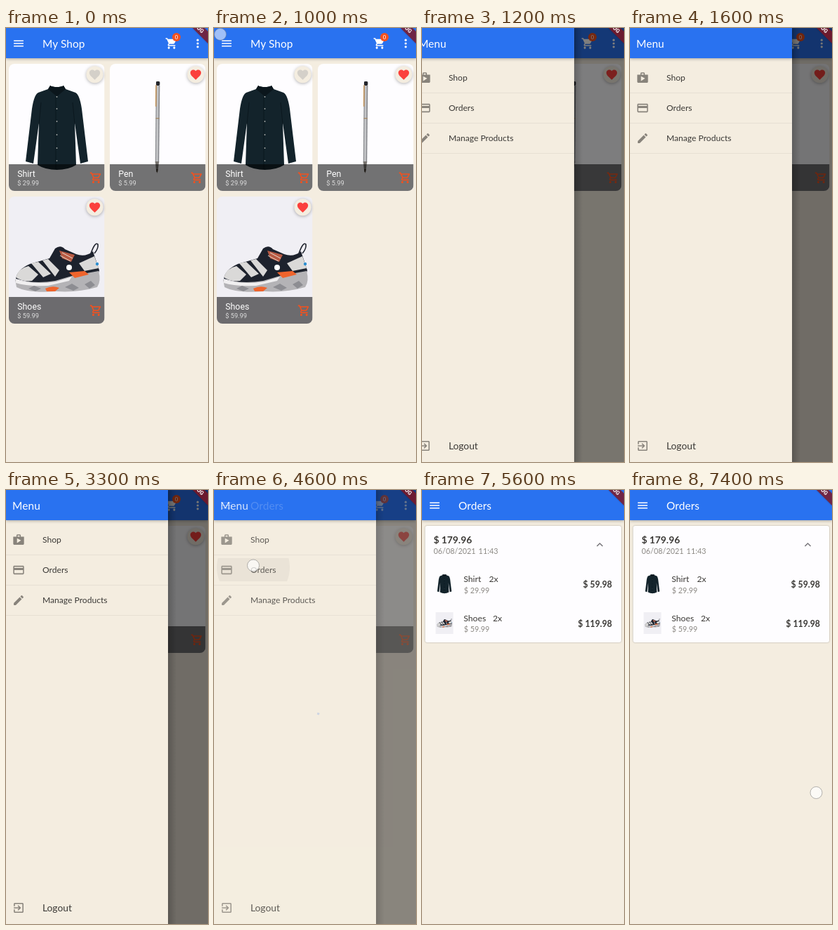
These frames come from a looping animation (288 by 618 pixels, 7500 ms). An HTML page:

```html
<!DOCTYPE html>
<html lang="en">
<head>
<meta charset="utf-8">
<title>Shop app</title>
<style>
  html, body { margin: 0; width: 100%; height: 100%; overflow: hidden; background: #f4ede0; }
  svg { display: block; width: 100%; height: 100%; }
  text { font-family: Lato, sans-serif; white-space: pre; }
  .roboto { font-family: Roboto, sans-serif; }
  .bold { font-weight: 700; }
  .bar { filter: drop-shadow(0 1.5px 2px rgba(0,0,0,.3)); }
  .card { filter: drop-shadow(0 .8px 1px rgba(0,0,0,.3)); }
</style>
</head>
<body>
<svg id="stage" viewBox="0 0 288 618"></svg>
<script>
const LOOP = 7500, DRAWER_W = 231;
const BLUE = '#2972f0', CREAM = '#f4ede0', ORANGE = '#f4511e';
const INK = '#3b3936', GREY = '#8b8883', ICON = '#88837b';

const wheels = 'M7 18c-1.1 0-1.99.9-1.99 2S5.9 22 7 22s2-.9 2-2-.9-2-2-2zm10 0c-1.1 0-1.99.9-1.99 2s.89 2 1.99 2 2-.9 2-2-.9-2-2-2z';
const icons = {
  menu: 'M3 18h18v-2H3v2zm0-5h18v-2H3v2zm0-7v2h18V6H3z',
  cart: wheels + 'M1 2v2h2l3.6 7.59-1.35 2.45c-.16.28-.25.61-.25.96 0 1.1.9 2 2 2h12v-2H7.42c-.14 0-.25-.11-.25-.25l.03-.12.9-1.63h7.45c.75 0 1.41-.41 1.75-1.03l3.58-6.49c.08-.14.12-.31.12-.48 0-.55-.45-1-1-1H5.21l-.94-2H1z',
  cartLine: wheels + 'M15.55 13c.75 0 1.41-.41 1.75-1.03l3.58-6.49c.37-.66-.11-1.48-.87-1.48H5.21l-.94-2H1v2h2l3.6 7.59-1.35 2.44C4.52 15.37 5.48 17 7 17h12v-2H7l1.1-2h7.45zM6.16 6h12.15l-2.76 5H8.53L6.16 6z',
  heart: 'M12 21.35l-1.45-1.32C5.4 15.36 2 12.28 2 8.5 2 5.42 4.42 3 7.5 3c1.74 0 3.41.81 4.5 2.09C13.09 3.81 14.76 3 16.5 3 19.58 3 22 5.42 22 8.5c0 3.78-3.4 6.86-8.55 11.54L12 21.35z',
  shop: 'M16 6V4c0-1.11-.89-2-2-2h-4c-1.11 0-2 .89-2 2v2H2v13c0 1.11.89 2 2 2h16c1.11 0 2-.89 2-2V6h-6zm-6-2h4v2h-4V4zM9 18V9l7.5 4L9 18z',
  card: 'M20 4H4c-1.11 0-1.99.89-1.99 2L2 18c0 1.11.89 2 2 2h16c1.11 0 2-.89 2-2V6c0-1.11-.89-2-2-2zm0 14H4v-6h16v6zm0-10H4V6h16v2z',
  edit: 'M3 17.25V21h3.75L17.81 9.94l-3.75-3.75L3 17.25zM20.71 7.04c.39-.39.39-1.02 0-1.41l-2.34-2.34c-.39-.39-1.02-.39-1.41 0l-1.83 1.83 3.75 3.75 1.83-1.83z',
  exit: 'M10.09 15.59L11.5 17l5-5-5-5-1.41 1.41L12.67 11H3v2h9.67l-2.58 2.59zM19 3H5c-1.11 0-2 .9-2 2v4h2V5h14v14H5v-4H3v4c0 1.1.89 2 2 2h14c1.1 0 2-.9 2-2V5c0-1.1-.9-2-2-2z',
  chevron: 'M12 8l-6 6 1.41 1.41L12 10.83l4.59 4.58L18 14z'
};

const icon = (name, x, y, fill) =>
  `<path d="${icons[name]}" fill="${fill}" transform="translate(${x} ${y}) scale(.768) translate(-12 -12)"/>`;
const text = (x, y, str, size, fill = INK, more = '') =>
  `<text x="${x}" y="${y}" font-size="${size}" fill="${fill}" ${more}>${str}</text>`;
const rect = (x, y, w, h, fill, more = '') =>
  `<rect x="${x}" y="${y}" width="${w}" height="${h}" fill="${fill}" ${more}/>`;
const path = (d, fill, more = '') => `<path d="${d}" fill="${fill}" ${more}/>`;
const appBar = (title, x = 52, w = 288) =>
  rect(0, 0, w, 43, BLUE, 'class="bar"') + text(x, 27.5, title, 15.4, '#fff', 'letter-spacing=".12"');

// left half, mirrored about x = 72.5
const halfShirt = path('M73 84Q66 84 63 82L60 87L46 92Q40 95 37 115L28 190L39 193L47 135L45 195Q56 202 73 202Z', '#13232b') +
  path('M73 98L60 87L63 82Q66 84 73 84Z', '#0b161c') +
  path('M47 137L50 106', 'none', 'stroke="#0a151b" stroke-width=".8"');
const shirt = halfShirt + `<g transform="translate(145 0) scale(-1 1)">${halfShirt}</g>` +
  path('M71 98V201', 'none', 'stroke="#0a151b" stroke-width=".8"') +
  [98, 115, 133, 152, 171, 189].map(y => `<circle cx="72.5" cy="${y}" r=".9" fill="#a9adab"/>`).join('');

const pen = `<g transform="rotate(.6 216 140)">` +
  rect(213.3, 82, 5.4, 110, 'url(#steel)') + rect(213.3, 76, 5.4, 6, '#24262b', 'rx="1.5"') +
  path('M213.3 190H218.7L217 205H215Z', '#77736f') + path('M214.7 201H217.3L216 207Z', '#3f3426') +
  rect(212.5, 81, 1.8, 31, '#c49a68', 'rx=".9"') + rect(213.3, 128, 5.4, 1.2, '#a58863') + '</g>';

const shoe = path('M121 321Q127 304 131 308Q132 314 126 321', 'none', 'stroke="#20242e" stroke-width="1.6"') +
  path('M14 357Q16 344 34 336L62 328L70 314Q78 308 84 315L100 322Q113 327 124 318L133 345L128 362L60 368Z', '#1d222d') +
  path('M14 355Q18 342 32 339L46 351L37 360Q24 362 14 355ZM36 335L46 333L64 350L53 355ZM52 331L60 329L76 345L70 354ZM104 335L126 325L132 342L112 346Z', '#dad9d8') +
  path('M76 317L98 323L93 333L80 328Z', '#b85a43') +
  path('M80 320L95 328M77 324L92 332', 'none', 'stroke="#e9d9cc" stroke-width="1"') +
  path('M13 358Q42 365 70 360L94 353L132 346Q136 360 130 369Q102 377 72 375Q32 378 15 369Z', '#b4b3b6') +
  path('M14 358Q42 366 72 361L94 354L90 360L60 367Q28 368 14 363Z', '#f0eff0') +
  path('M90 348L112 346L118 351L98 356ZM56 371Q66 366 76 370L70 375H58Z', '#ef642c') +
  path('M32 371L40 367L50 371L42 375ZM84 369L94 364L104 370L96 374ZM112 365L121 360L127 366L119 371Z', '#8d8d92') +
  '<circle cx="130" cy="336" r="2.2" fill="#2f8fd0"/><circle cx="90" cy="341" r="4" fill="#fff"/>';

function tile(x, y, name, price, photo, back, liked) {
  return `<g clip-path="inset(0 round 8px)">${rect(x, y, 136.5, 181, back)}${photo}
      ${rect(x, y + 143, 136.5, 38, '#000', 'opacity=".55"')}</g>` +
    text(x + 12.3, y + 161, name, 12.3, '#fff', 'class="roboto"') +
    text(x + 12.3, y + 173, price, 9.2, '#dedede', 'class="roboto"') +
    icon('cartLine', x + 124.3, y + 162.3, ORANGE) +
    `<circle cx="${x + 122.5}" cy="${y + 15.3}" r="12" fill="${CREAM}" class="bar"/>` +
    icon('heart', x + 122.5, y + 15.5, liked ? '#fb403c' : '#d4d0c9');
}

const menuRow = (y, name, label, size = 12.1) =>
  icon(name, 18, y, ICON) + text(52, y + size * .37, label, size);

const orderRow = (y, name, qtyX, price, total) =>
  text(59.3, y, name, 12.2) + text(qtyX, y, '2x', 12.2) +
  text(59.8, y + 15.5, price, 10.75, GREY) +
  text(271, y + 8, total, 12.3, INK, 'class="bold" text-anchor="end"');

document.getElementById('stage').innerHTML = `
  <defs>
    <linearGradient id="steel"><stop stop-color="#77797d"/><stop offset=".45" stop-color="#d6d7d9"/><stop offset="1" stop-color="#707277"/></linearGradient>
    <linearGradient id="shade"><stop stop-opacity=".2"/><stop offset="1" stop-opacity="0"/></linearGradient>
    <clipPath id="fold"><rect id="foldBox" x="4" y="51" width="281" height="166"/></clipPath>
    <clipPath id="row"><rect x="0" y="97" width="231" height="33"/></clipPath>
  </defs>
  <g id="shop">
    ${rect(0, 0, 288, 618, CREAM)}
    ${tile(4, 51, 'Shirt', '$ 29.99', shirt, '#fefdff', false)}
    ${tile(148, 51, 'Pen', '$ 5.99', pen, '#fefdff', true)}
    ${tile(4, 240, 'Shoes', '$ 59.99', shoe, '#f0eff4', true)}
    ${appBar('My Shop')}
    ${icon('menu', 18, 22, '#fff')}
    ${icon('cart', 236, 22, '#fff')}
    <circle cx="243" cy="13" r="6" fill="${ORANGE}"/>
    ${text(243, 15.8, '0', 7.7, '#fff', 'text-anchor="middle"')}
    ${[17.2, 22, 26.8].map(y => `<circle cx="273.3" cy="${y}" r="1.6" fill="#fff"/>`).join('')}
  </g>
  ${rect(0, 0, 288, 618, '#000', 'id="scrim"')}
  <g id="drawer">
    ${rect(DRAWER_W, 0, 12, 618, 'url(#shade)')}
    ${rect(0, 0, DRAWER_W, 618, CREAM)}
    ${appBar('Menu', 9, DRAWER_W)}
    <g clip-path="url(#row)"><circle id="ripple" cx="56" cy="110" fill="#000" opacity=".05"/></g>
    ${[92.5, 135.5, 178.5].map(y => rect(0, y - .4, DRAWER_W, .8, '#000', 'opacity=".08"')).join('')}
    ${menuRow(71, 'shop', 'Shop')}
    ${menuRow(114, 'card', 'Orders')}
    ${menuRow(157, 'edit', 'Manage Products')}
    ${menuRow(595, 'exit', 'Logout', 13.8)}
  </g>
  <g id="orders">
    ${rect(0, 0, 288, 618, CREAM)}
    ${appBar('Orders')}
    ${icon('menu', 18, 22, '#fff')}
    <path id="spinner" fill="none" stroke="${BLUE}" stroke-width="3"/>
    <g id="list">
      ${rect(4.5, 51, 279.5, 166, '#fefdff', 'id="sheet" rx="3" class="card"')}
      <g clip-path="url(#fold)">
        ${text(16.5, 75.5, '$ 179.96', 13.8, INK, 'class="bold"')}
        ${text(16.5, 91, '06/08/2021 11:43', 10.75, GREY, 'letter-spacing=".05" word-spacing="1.2"')}
        <g id="arrow">${icon('chevron', 253.5, 78, '#77757a')}</g>
        <g transform="translate(15.3 101.7) scale(.23 .225)">${shirt}</g>
        ${rect(19.5, 174, 25, 31, '#f0eff4')}
        <g transform="translate(18.8 128) scale(.18)">${shoe}</g>
        ${orderRow(131, 'Shirt', 95.5, '$ 29.99', '$ 59.98')}
        ${orderRow(186.5, 'Shoes', 101, '$ 59.99', '$ 119.98')}
      </g>
    </g>
  </g>
  <g opacity=".82">${path('M265 -1H282L289 6V23Z', '#7f1520', 'class="card"')}</g>
  ${text(0, 0, 'UG', 7.8, '#fff', 'class="roboto bold" transform="translate(271.6 .4) rotate(45)"')}
  <circle id="touch" r="8.5" fill="#fff" fill-opacity=".7" stroke="#777" stroke-opacity=".6" stroke-width=".9"/>`;

const $ = id => document.getElementById(id);
const set = (id, attrs) => { for (const k in attrs) $(id).setAttribute(k, attrs[k]); };
const ramp = (t, from, to) => Math.min(1, Math.max(0, (t - from) / (to - from)));
const ease = p => p * p * (3 - 2 * p);

// x, y, start, end
const touches = [
  [9, 9, 740, 1160], [56, 107.5, 4340, 4850], [253, 78, 5140, 5520],
  [268, 436, 6440, 6700], [265.5, 431, 7050, 7900]
];

function arc(cx, cy, r, a, b) {
  const at = q => `${cx + r * Math.sin(q)} ${cy - r * Math.cos(q)}`;
  return `M${at(a)}A${r} ${r} 0 ${b - a > Math.PI ? 1 : 0} 1 ${at(b)}`;
}

function draw(t) {
  // critically damped spring
  const u = Math.max(0, t - 1000) * .0224;
  const open = 1 - (1 + u) * Math.exp(-u);
  set('drawer', { transform: `translate(${DRAWER_W * (open - 1)} 0)`, visibility: open > .01 ? 'visible' : 'hidden' });
  set('scrim', { opacity: .54 * open });
  set('ripple', { r: t < 4400 ? 0 : 14 + 38 * ramp(t, 4400, 4600) });

  set('orders', { opacity: ramp(t, 4545, 4845) });
  const loaded = t >= 4980;
  const spin = Math.max(0, t - 4560) / 1333;
  const tail = .15 + spin * 3.77;
  set('spinner', {
    d: arc(144, 330, 12.3, tail, tail + .2 + 4.7 * ease(Math.min(1, spin * 2))),
    visibility: loaded ? 'hidden' : 'visible'
  });
  set('list', { visibility: loaded ? 'visible' : 'hidden' });
  const height = 55 + 111 * ease(ramp(t, 5260, 5560));
  set('sheet', { height });
  set('foldBox', { height });
  set('arrow', { transform: t < 5260 ? 'rotate(180 253.5 78)' : '' });

  const hit = touches.find(([, , a, b]) => t >= a && t < b);
  if (hit) {
    const [x, y, a, b] = hit;
    set('touch', { cx: x, cy: y, opacity: Math.min(1, (t - a) / 80, (b - t) / 200) });
  } else set('touch', { opacity: 0 });
}

const start = performance.now();
function frame() {
  draw((performance.now() - start) % LOOP);
  requestAnimationFrame(frame);
}
frame();
</script>
</body>
</html>
```
